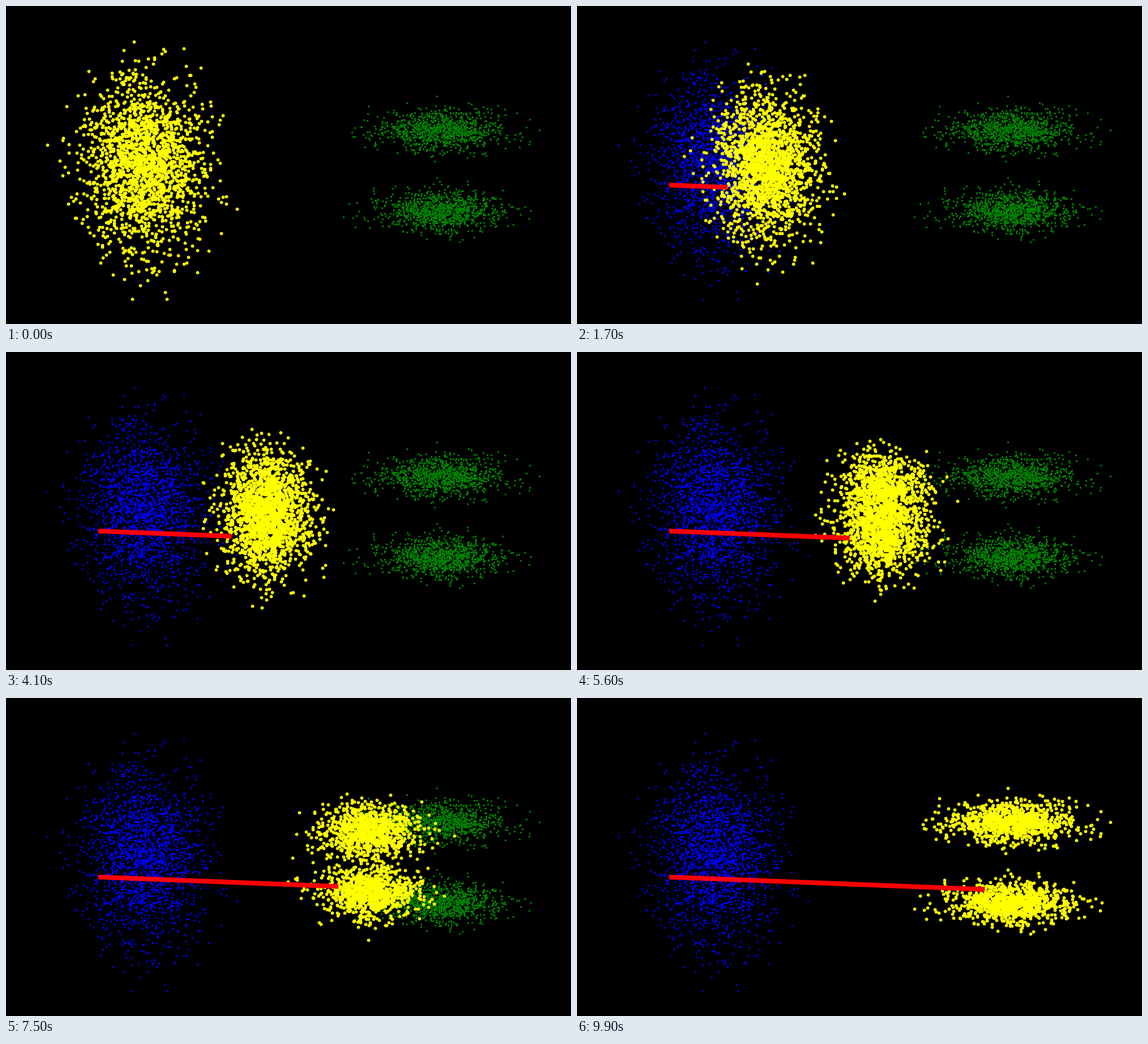
These frames come from a looping animation (998x561 px, 10000 ms). A matplotlib script:

```python
import numpy as np
import matplotlib.pyplot as plt
from matplotlib.animation import FuncAnimation

W, H, DPI = 998, 561, 64
FRAMES, INTERVAL = 100, 100
N = 2000
REACH = 3.4  # farthest particle, in standard deviations
rng = np.random.default_rng(7)


def px(v):
    """Pixels to points."""
    return v * 72 / DPI


def cloud(n, center, sd):
    """Normal scatter around a center."""
    z = rng.standard_normal((2 * n, 2))
    z = z[np.hypot(z[:, 0], z[:, 1]) < REACH][:n]
    return center + z * sd


# One wide cloud splits at random into two flat ones.
start = cloud(N, (242, 284), (52, 74))
end = rng.permutation(np.vstack([
    cloud(N // 2, (767, y), (54, 18)) for y in (219, 361.5)
]))

# The first particle draws the trail.
start[0] = 167, 316
end[0] = 716, 337.5

fig = plt.figure(figsize=(W / DPI, H / DPI), dpi=DPI, facecolor="black")
ax = fig.add_axes([0, 0, 1, 1])
ax.set_xlim(0, W)
ax.set_ylim(H, 0)
ax.axis("off")


def dots(p, color, size):
    return ax.plot(*p.T, "o", color=color, ms=px(size), mew=0)[0]


dots(start, "blue", 3.3)
dots(end, "green", 3.4)
movers = dots(start, "yellow", 5.8)
trail, = ax.plot([], [], color="red", lw=px(8.33),
                 solid_capstyle="projecting")


def update(i):
    p = start + (end - start) * i / (FRAMES - 1)
    movers.set_data(*p.T)
    trail.set_data(*np.array([start[0], p[0]]).T)
    trail.set_visible(i > 0)
    return movers, trail


anim = FuncAnimation(fig, update, frames=FRAMES, interval=INTERVAL,
                     repeat=True, repeat_delay=0)
plt.show()
```
